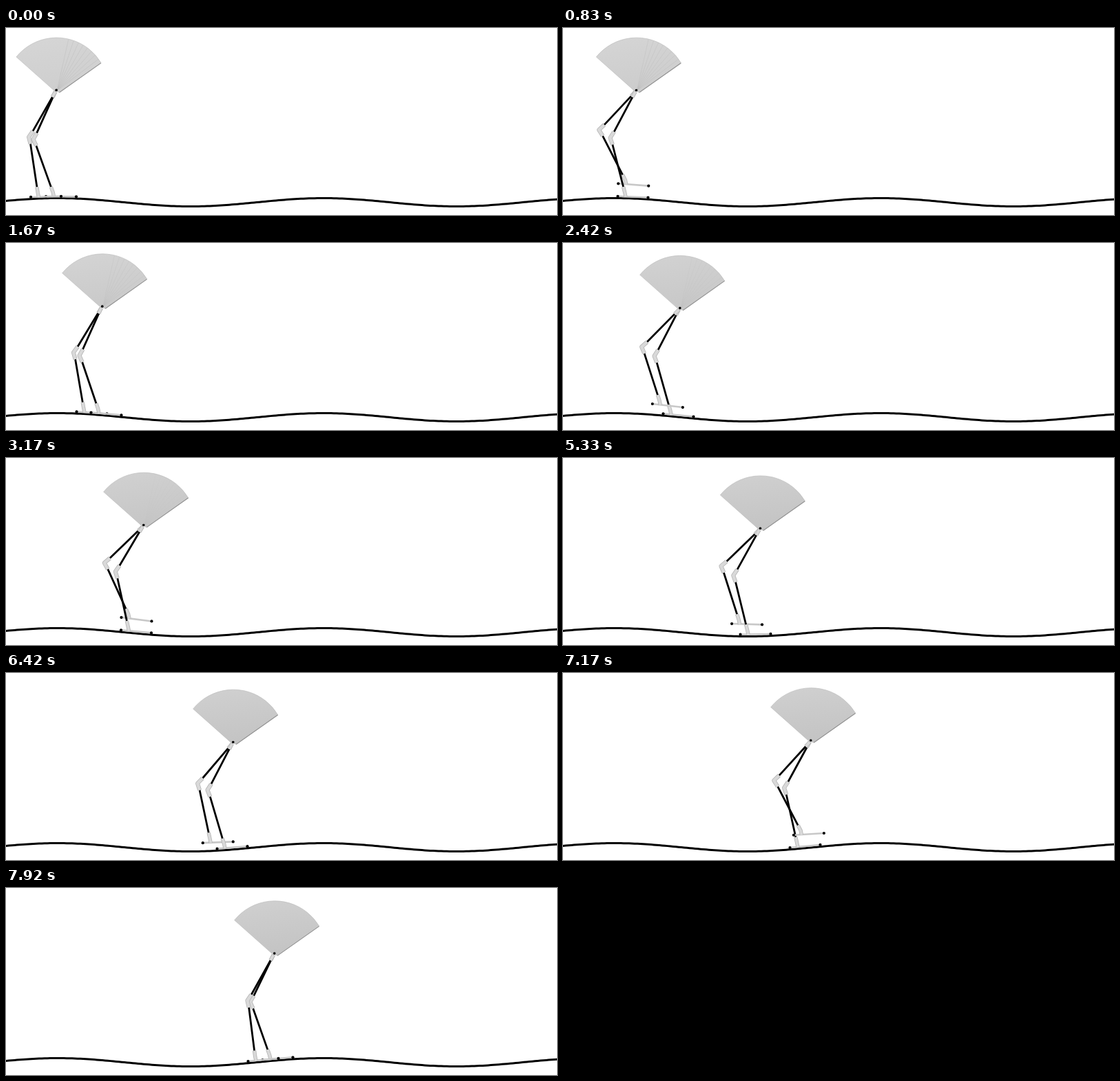
Write an HTML page with a canvas that moves like this. It is 800 by 272 pixels and loops after 8 s.

```html
<!DOCTYPE html>
<html lang="en">
<head>
<meta charset="utf-8">
<title>Walking fan</title>
<style>
  html, body { margin: 0; width: 100%; height: 100%; overflow: hidden; background: #fff; }
  canvas { display: block; }
</style>
</head>
<body>
<canvas id="stage" width="800" height="272"></canvas>
<script>
const ctx = document.getElementById('stage').getContext('2d');
const LOOP = 8000;
const TICK = 250 / 3;
const THIGH = 76, SHIN = 82;
const HEEL = 10.5, TOE = 33.5, FOOT_CLEARANCE = 2.7, LIFT = 18.5;

// Ankle x of each footfall; even ones belong to the near leg.
const FOOTFALLS = [46.5, 68.5, 90, 113, 134, 156, 177.5, 200, 221.5, 245,
                   268, 293, 317, 340, 362, 383, 406, 428];
// [time, steps taken]
const PACE = [[0, 0], [1667, 3], [3167, 5.5], [4333, 7.64],
              [5333, 9.31], [6417, 11.17], [7917, 14], [8500, 15]];

const ground = x => 253.5 - 6 * Math.cos((x - 75) * 2 * Math.PI / 386);

function stepsAt(t) {
  let i = 0;
  while (t > PACE[i + 1][0]) i++;
  const [t0, n0] = PACE[i], [t1, n1] = PACE[i + 1];
  return n0 + (n1 - n0) * (t - t0) / (t1 - t0);
}

// Footfall index and swing angle (0 while planted) of leg 0 (near) or 1 (far).
function footAt(steps, leg) {
  const n = Math.floor(steps + 1e-6);
  const swinging = n % 2 === leg;
  const from = swinging ? n : n + 1;
  const angle = swinging ? Math.PI * Math.max(0, steps - n) : 0;
  const next = swinging ? FOOTFALLS[from + 2] : FOOTFALLS[from];
  const x = FOOTFALLS[from] + (next - FOOTFALLS[from]) * (1 - Math.cos(angle)) / 2;
  const up = Math.sin(angle);
  const y = px => ground(px) - FOOT_CLEARANCE - LIFT * up;
  const heel = { x: x - HEEL, y: y(x - HEEL) };
  const toe = { x: x + TOE, y: y(x + TOE) + 1.5 * up };
  return { x, y: heel.y + (toe.y - heel.y) * HEEL / (HEEL + TOE), heel, toe };
}

function kneeOf(hip, ankle) {
  const dx = ankle.x - hip.x, dy = ankle.y - hip.y;
  const d = Math.min(Math.hypot(dx, dy), THIGH + SHIN - 0.01);
  const bend = Math.acos((THIGH * THIGH + d * d - SHIN * SHIN) / (2 * THIGH * d));
  const a = Math.atan2(dy, dx) + bend;
  return { x: hip.x + THIGH * Math.cos(a), y: hip.y + THIGH * Math.sin(a) };
}

function toward(a, b, len) {
  const k = len / Math.hypot(b.x - a.x, b.y - a.y);
  return { x: a.x + (b.x - a.x) * k, y: a.y + (b.y - a.y) * k };
}

function line(points, width, color) {
  ctx.beginPath();
  points.forEach(p => ctx.lineTo(p.x, p.y));
  ctx.lineWidth = width;
  ctx.strokeStyle = color;
  ctx.stroke();
}

function dot(p, r) {
  ctx.beginPath();
  ctx.arc(p.x, p.y, r, 0, 2 * Math.PI);
  ctx.fillStyle = '#000';
  ctx.fill();
}

function sleeve(points, width) {
  line(points, width, '#b4b4b4');
  line(points, width - 1.6, '#d9d9d9');
}

function drawLeg(hip, foot) {
  const ankle = { x: foot.x - 0.3, y: foot.y - 6 };
  const knee = kneeOf(hip, ankle);
  line([foot.heel, foot.toe], 2.6, '#c8c8c8');
  dot(foot.heel, 2.1);
  dot(foot.toe, 2.1);
  line([hip, knee, ankle], 2.8, '#000');
  const elbow = { x: knee.x - 1, y: knee.y };
  sleeve([toward(knee, hip, 10), elbow, toward(knee, ankle, 10)], 6);
  sleeve([toward(ankle, knee, 8.5), ankle, { x: foot.x + 1, y: foot.y + 0.5 }], 5.4);
  sleeve([hip, toward(hip, knee, 9)], 5.4);
}

function drawFan(x, top, t) {
  ctx.save();
  ctx.translate(x, top);
  const left = Math.atan2(-47.2, -58.5), right = Math.atan2(-38.7, 64.5);
  ctx.beginPath();
  ctx.arc(1.5, 75.2, 75.2, left, right);
  ctx.lineTo(5.5, 79.5);
  ctx.lineTo(-2, 77);
  ctx.closePath();
  const fade = Math.max(0, 1 - t / 4000);
  const tone = v => `rgb(${[v, v, v].map(Math.round)})`;
  const fill = ctx.createLinearGradient(0, 0, 10, 80);
  fill.addColorStop(0, tone(207 + 6 * fade));
  fill.addColorStop(1, tone(195 + 11 * fade));
  ctx.fillStyle = fill;
  ctx.fill();
  ctx.lineWidth = 0.7;
  ctx.strokeStyle = '#bdbdbd';
  ctx.stroke();
  ctx.save();
  ctx.clip();
  for (let i = 1; i < 9; i++) {
    const a = -1.45 + i * 0.1;
    line([{ x: 2, y: 77 }, { x: 2 + 80 * Math.cos(a), y: 77 + 80 * Math.sin(a) }],
         0.8, `rgba(170,170,170,${0.35 * fade})`);
  }
  ctx.restore();
  line([{ x: 5.5, y: 79.6 }, { x: 66, y: 36.8 }], 1.1, '#929292');
  ctx.restore();
}

function drawGround() {
  const points = [];
  for (let x = -4; x <= 804; x += 4) points.push({ x, y: ground(x) });
  line(points, 3, '#000');
}

function draw(t) {
  ctx.fillStyle = '#fff';
  ctx.fillRect(0, 0, 800, 272);
  ctx.lineJoin = 'round';
  const x = 72 + 0.04 * t;
  const top = ground(x - 13) - 233.6;
  const hip = { x: x - 0.3, y: top + 78.5 };
  const steps = stepsAt(t);
  drawGround();
  drawFan(x, top, t);
  drawLeg(hip, footAt(steps, 1));
  drawLeg(hip, footAt(steps, 0));
  dot({ x: x + 1.1, y: top + 76.3 }, 1.8);
}

const start = performance.now();
function tick() {
  const t = Math.max(0, performance.now() - start) % LOOP;
  draw(Math.min(95, Math.floor((t + 5) / TICK)) * TICK);
  requestAnimationFrame(tick);
}
tick();
</script>
</body>
</html>
```
